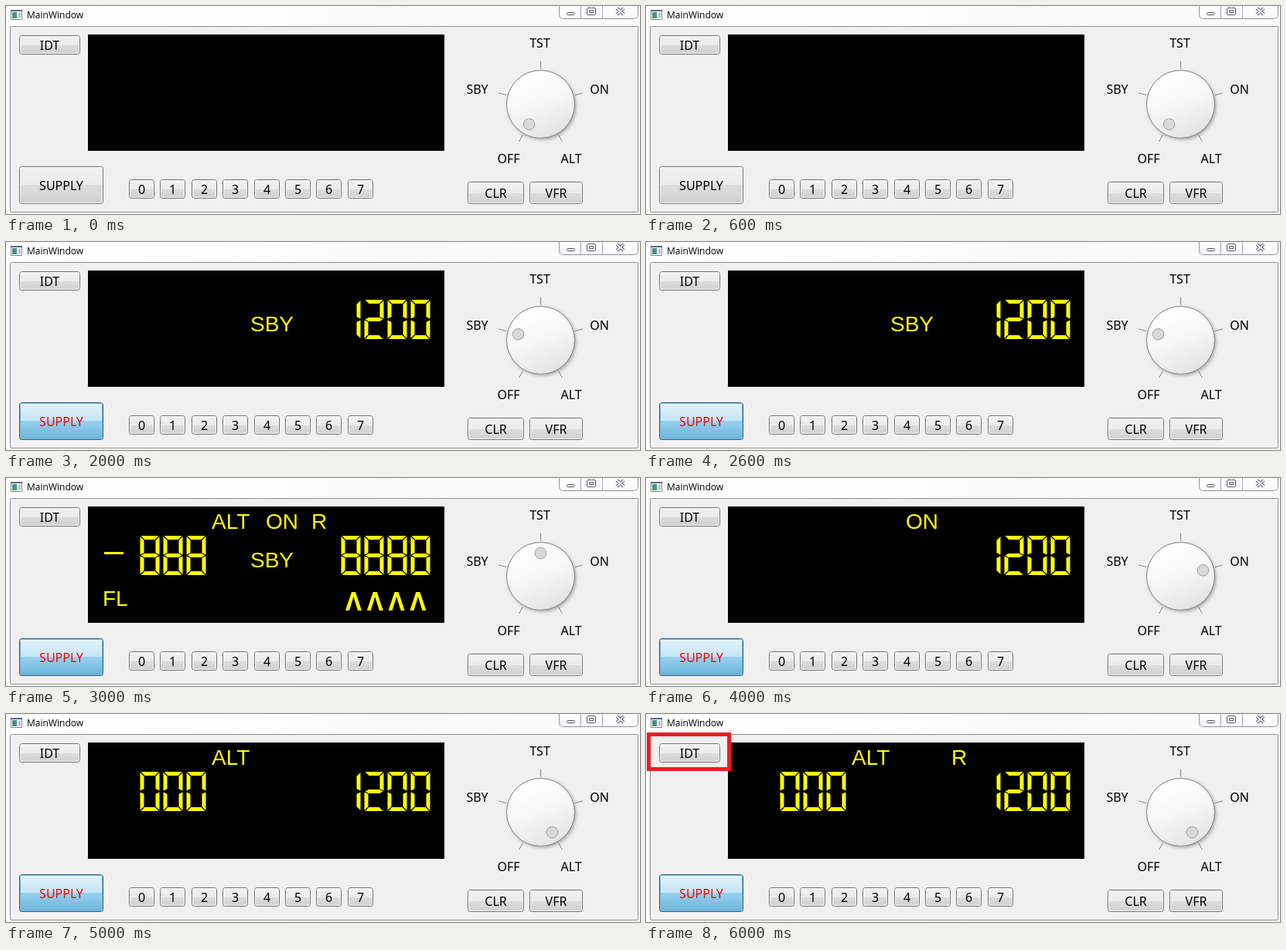
An HTML page with a canvas that plays this animation: 820 by 270 pixels, repeating every 7 s.

```html
<!DOCTYPE html>
<html lang="en">
<head>
<meta charset="utf-8">
<title>MainWindow</title>
<style>
html, body { margin: 0; width: 820px; height: 270px; overflow: hidden; background: #fff; }
canvas { display: block; }
</style>
</head>
<body>
<canvas id="stage" width="820" height="270"></canvas>
<script>
const ctx = document.getElementById('stage').getContext('2d');
const UI = '16px "Noto Sans", sans-serif';
const LCD = '28px "Liberation Sans", Arial, sans-serif';
const YELLOW = '#ffff00';
const DIAL = { x: 691.5, y: 127.5, r: 44 };

const LABELS = [['TST', 690.5, 54], ['SBY', 609.5, 114], ['ON', 767.5, 114], ['OFF', 650, 204], ['ALT', 731, 204]];
const WORDS = { ALT: [266, 66], ON: [336, 66], R: [395, 66], SBY: [316, 116], FL: [125, 166] };

// One state per second; angle is measured clockwise from the top of the dial.
const STATES = [
  { angle: -150 },
  { angle: -150, power: true, mark: [8.5, 199.5, 126, 63] },
  { angle: -75, power: true, words: ['SBY'], code: '1200' },
  { angle: 0, power: true, words: Object.keys(WORDS), code: '8888', level: '888', test: true },
  { angle: 75, power: true, words: ['ON'], code: '1200' },
  { angle: 150, power: true, words: ['ALT'], code: '1200', level: '000' },
  { angle: 150, power: true, words: ['ALT', 'R'], code: '1200', level: '000', mark: [3.5, 26.5, 104, 45] }
];

function text(str, x, y, font, color, align = 'left') {
  ctx.font = font;
  ctx.fillStyle = color;
  ctx.textAlign = align;
  ctx.fillText(str, x, y);
}

function gradient(x0, y0, x1, y1, stops) {
  const g = ctx.createLinearGradient(x0, y0, x1, y1);
  stops.forEach(([at, color]) => g.addColorStop(at, color));
  return g;
}

function roundRect(x, y, w, h, r, fill, stroke) {
  ctx.beginPath();
  ctx.roundRect(x, y, w, h, r);
  if (fill) { ctx.fillStyle = fill; ctx.fill(); }
  if (stroke) { ctx.strokeStyle = stroke; ctx.lineWidth = 1; ctx.stroke(); }
}

function circle(x, y, r, fill, stroke) {
  ctx.beginPath();
  ctx.arc(x, y, r, 0, Math.PI * 2);
  ctx.fillStyle = fill;
  ctx.fill();
  if (stroke) { ctx.strokeStyle = stroke; ctx.lineWidth = 1; ctx.stroke(); }
}

function polygon(points) {
  ctx.beginPath();
  for (let i = 0; i < points.length; i += 2) ctx.lineTo(points[i], points[i + 1]);
  ctx.fill();
}

function button(label, x, y, w, h, lit) {
  const [a, b, c, d] = lit
    ? ['#e5f4fc', '#c4e5f6', '#98d1ef', '#68b3db']
    : ['#f2f2f2', '#ebebeb', '#dddddd', '#cfcfcf'];
  const fill = gradient(0, y, 0, y + h, [[0, a], [0.5, b], [0.5, c], [1, d]]);
  roundRect(x + 0.5, y + 0.5, w - 1, h - 1, 3, fill, lit ? '#2c628b' : '#707070');
  roundRect(x + 1.5, y + 1.5, w - 3, h - 3, 2, null, lit ? '#7fb2cf' : '#fafafa');
  text(label, x + w / 2, y + h / 2 + 6, UI, lit ? '#ff0000' : '#000', 'center');
}

function titleBar() {
  ctx.fillStyle = gradient(0, 0, 820, 0, [[0, '#fff'], [0.4, '#fdfdfd'], [0.6, '#f8f8f8'], [1, '#fbfbfb']]);
  ctx.fillRect(0, 0, 820, 270);
  roundRect(6.5, 5.5, 14, 12, 0, '#fff', '#7d8790');
  ctx.fillStyle = '#53677c';
  ctx.fillRect(6, 5, 15, 2);
  ctx.fillStyle = gradient(0, 8, 0, 16, [[0, '#3f8f9c'], [1, '#4a9a58']]);
  ctx.fillRect(8, 8, 6, 8);
  ctx.fillStyle = '#b5bcc4';
  ctx.fillRect(16, 9, 3, 6);
  text('MainWindow', 27, 16, '12px "Open Sans", sans-serif', '#000');

  roundRect(715.5, -5.5, 102, 22, 5, '#fcfcfc', '#8f949a');
  ctx.fillStyle = '#a6aaae';
  ctx.fillRect(743, 0, 1, 16);
  ctx.fillRect(771, 0, 1, 16);
  roundRect(725.5, 8.5, 10, 3, 1, '#fff', '#535666');
  roundRect(751.5, 2.5, 11, 9, 1, '#fff', '#535666');
  roundRect(754.5, 5.5, 5, 3, 0, '#fff', '#535666');
  for (const [width, color] of [[4, '#535666'], [2, '#fff']]) {
    ctx.strokeStyle = color;
    ctx.lineWidth = width;
    ctx.beginPath();
    ctx.moveTo(790, 3); ctx.lineTo(799, 11);
    ctx.moveTo(799, 3); ctx.lineTo(790, 11);
    ctx.stroke();
  }
}

function dial(angle) {
  const { x, y, r } = DIAL;
  for (let deg = -150; deg <= 150; deg += 75) {
    const a = deg * Math.PI / 180;
    ctx.strokeStyle = '#808080';
    ctx.lineWidth = 1;
    ctx.beginPath();
    ctx.moveTo(x + 46 * Math.sin(a), y - 46 * Math.cos(a));
    ctx.lineTo(x + 56 * Math.sin(a), y - 56 * Math.cos(a));
    ctx.stroke();
  }
  ctx.save();
  ctx.shadowColor = 'rgba(0,0,0,.3)';
  ctx.shadowBlur = 4;
  ctx.shadowOffsetX = ctx.shadowOffsetY = 2;
  circle(x, y, r, '#eee');
  ctx.restore();
  const face = gradient(x - 18, y - r, x + 18, y + r, [[0, '#fff'], [0.5, '#f6f6f6'], [1, '#e2e2e2']]);
  circle(x, y, r, face, '#7c7c7c');
  const a = angle * Math.PI / 180;
  circle(x + 30 * Math.sin(a), y - 30 * Math.cos(a), 7.3, '#d9d9d9', '#9c9c9c');
}

// Seven segments from three shapes, mirrored about the digit's centre.
const BAR = [-11.5, -25.5, 11.5, -25.5, 6.7, -20.5, -6.7, -20.5];
const SIDE = [-12.5, -24.5, -12.5, -1, -7.5, -3.2, -7.5, -19.5];
const MIDDLE = [-11.5, 0, -7, -2.5, 7, -2.5, 11.5, 0, 7, 2.5, -7, 2.5];
const SEGMENTS = [
  [BAR, 1, 1], [SIDE, 1, 1], [SIDE, -1, 1], [MIDDLE, 1, 1],
  [SIDE, 1, -1], [SIDE, -1, -1], [BAR, 1, -1]
];
const LIT = { 0: '012456', 1: '25', 2: '02346', 8: '0123456' };

function digits(str, left) {
  ctx.fillStyle = YELLOW;
  [...str].forEach((d, i) => {
    for (const s of LIT[d]) {
      const [shape, sx, sy] = SEGMENTS[s];
      ctx.save();
      ctx.translate(left + 12.5 + 30 * i, 100.5);
      ctx.scale(sx, sy);
      polygon(shape);
      ctx.restore();
    }
  });
}

function display({ words = [], code = '', level = '', test }) {
  ctx.fillStyle = '#000';
  ctx.fillRect(106, 37, 461, 151);
  words.forEach(w => text(w, ...WORDS[w], LCD, YELLOW));
  digits(level, 173.5);
  digits(code, 433.5);
  if (!test) return;
  ctx.fillRect(127, 96, 25, 3);
  for (let i = 0; i < 4; i++) {
    const x = 449.5 + 27.8 * i;
    polygon([x - 10.5, 172, x - 2.5, 148, x + 2.5, 148, x + 10.5, 172, x + 5.5, 172, x, 154, x - 5.5, 172]);
  }
}

function draw(state) {
  titleBar();
  roundRect(5.5, 26.5, 812, 241, 1, '#f0f0f0', '#8c8c8c');
  display(state);
  button('IDT', 17, 38, 79, 25);
  button('SUPPLY', 17, 208, 109, 49, state.power);
  for (let i = 0; i < 8; i++) button(String(i), Math.round(159 + 40.4 * i), 225, 33, 25);
  button('CLR', 597, 228, 73, 29);
  button('VFR', 677, 228, 69, 29);
  LABELS.forEach(([label, x, y]) => text(label, x, y, UI, '#000', 'center'));
  dial(state.angle);
  if (state.mark) {
    ctx.strokeStyle = '#ed1c24';
    ctx.lineWidth = 5;
    ctx.strokeRect(...state.mark);
  }
}

function tick() {
  draw(STATES[Math.floor(performance.now() / 1000) % STATES.length]);
  requestAnimationFrame(tick);
}
tick();
</script>
</body>
</html>
```
